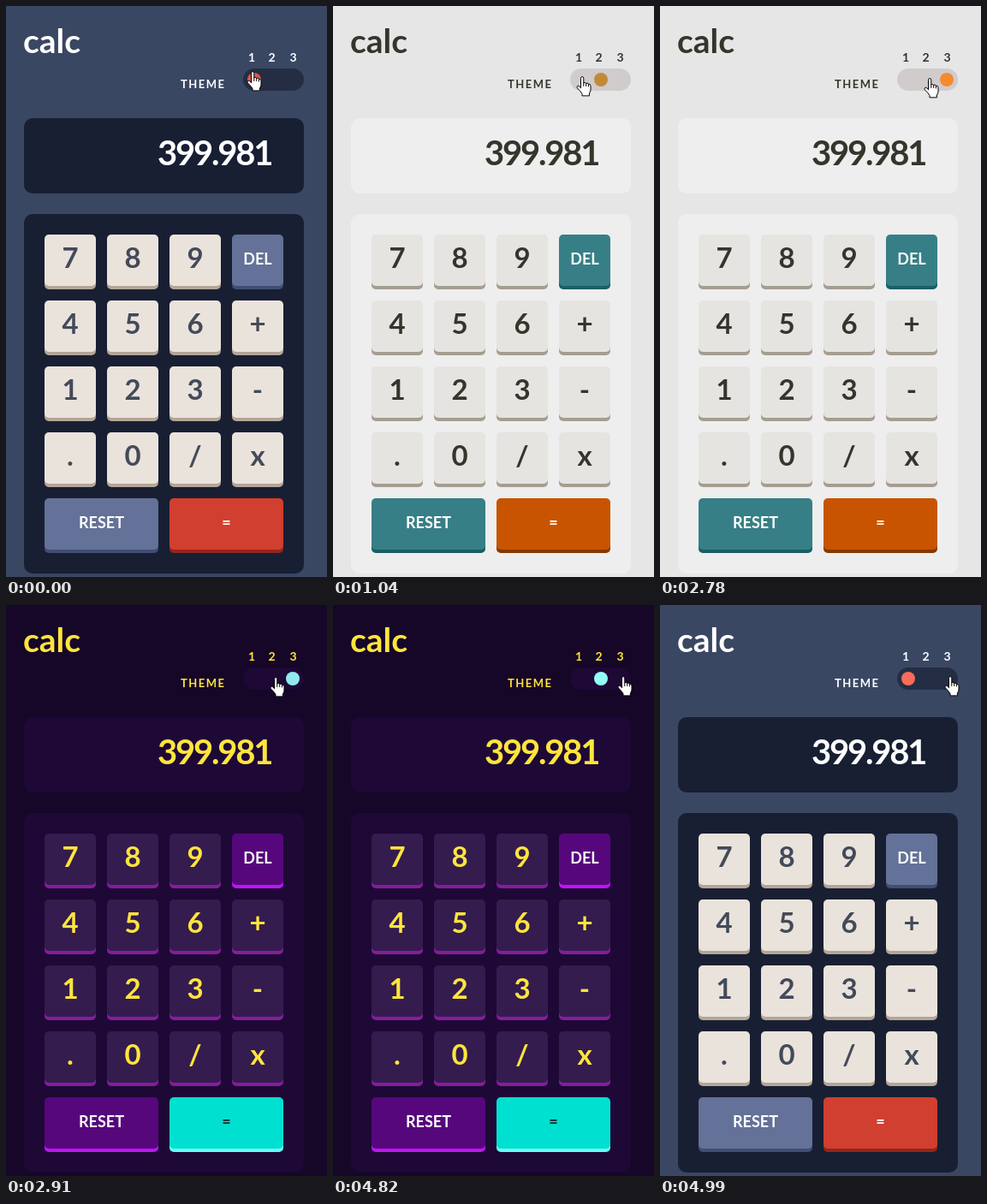
Write an HTML page that moves like this. It is 375 by 667 pixels and loops after 5870 ms.

```html
<!DOCTYPE html>
<html lang="en">
<head>
<meta charset="utf-8">
<title>Calculator themes</title>
<style>
  html, body { margin: 0; width: 100%; height: 100%; overflow: hidden; }
  svg { display: block; width: 375px; height: 667px; font-family: Lato, "Open Sans", sans-serif; font-weight: 700; }
  .t1 { --bg: #3a4763; --track: #242d44; --panel: #181f33; --text: #fff; --key: #eae3dc; --edge: #b4a597;
        --digit: #434a59; --alt: #647198; --altEdge: #414e73; --eq: #d03f2f; --eqEdge: #93261a; --eqText: #fff; }
  .t2 { --bg: #e6e6e6; --track: #d1cccc; --panel: #eee; --text: #35352c; --key: #e5e4e0; --edge: #a69d91;
        --digit: #35352c; --alt: #377f86; --altEdge: #1b5f65; --eq: #c85401; --eqEdge: #873901; --eqText: #fff; }
  .t3 { --bg: #160628; --track: #1e0836; --panel: #1e0836; --text: #ffe53d; --key: #341c4f; --edge: #871c9c;
        --digit: #ffe53d; --alt: #56077c; --altEdge: #be15f4; --eq: #00e0d1; --eqEdge: #6cf9f2; --eqText: #1b2428; }
  .bg { fill: var(--bg); }
  .track { fill: var(--track); }
  .panel { fill: var(--panel); }
  .label { fill: var(--text); }
  .mid { text-anchor: middle; }
  .key rect { fill: var(--key); }
  .key .edge { fill: var(--edge); }
  .key text { fill: var(--digit); font-size: 33px; }
  .alt rect { fill: var(--alt); }
  .alt .edge { fill: var(--altEdge); }
  .alt text { fill: #fff; font-size: 18px; }
  .eq rect { fill: var(--eq); }
  .eq .edge { fill: var(--eqEdge); }
  .eq text { fill: var(--eqText); font-size: 18px; }
</style>
</head>
<body>
<svg id="stage" class="t1" viewBox="0 0 375 667">
  <clipPath id="lower"><rect x="270" y="84" width="80" height="20"/></clipPath>
  <rect class="bg" width="375" height="667"/>
  <text class="label" x="20" y="55" font-size="39">calc</text>
  <text class="label" x="204" y="96" font-size="13" letter-spacing="1.5">THEME</text>
  <g class="label mid" font-size="14">
    <text x="287" y="65">1</text><text x="310.5" y="65">2</text><text x="335.5" y="65">3</text>
  </g>
  <rect class="track" x="277" y="73" width="71" height="26" rx="13"/>
  <circle id="knob" cy="86" r="8"/>
  <circle id="glow" cy="86" r="8" clip-path="url(#lower)"/>
  <rect class="panel" x="21" y="131" width="327" height="88" rx="10"/>
  <text class="label" x="177" y="186" font-size="40" letter-spacing="-2.2">399.981</text>
  <rect class="panel" x="21" y="243" width="327" height="420" rx="10"/>
  <g id="keys" class="mid"></g>
  <g id="hand" stroke="#000" stroke-linejoin="round" stroke-linecap="round">
    <path fill="#fff" d="M5.5 13.5V2.5Q5.5.6 7.1.6Q8.8.6 8.8 2.5V7.8Q10.3 6.9 11.7 8.3Q13.2 7.5 14.4 9.1Q16.9 8.9 17 11.5V16Q17 18 15.4 20V22.9H7V20.5Q5 17.2 1.3 13.8Q.3 12 2.2 11.2Q3.9 11.2 5.5 13.5Z"/>
    <path fill="none" d="M8.8 8V11.5M11.7 8.5V11.5M14.4 9.3V12"/>
  </g>
</svg>
<script>
const LOOP = 5870;
const $ = id => document.getElementById(id);
const stage = $('stage'), knob = $('knob'), glow = $('glow'), hand = $('hand');

function key(label, x, y, w, type) {
  const base = type ? 35 : 39;
  return `<g class="${type || 'key'}" transform="translate(${x} ${y})">
    <rect class="edge" y="4" width="${w}" height="60" rx="5"/>
    <rect width="${w}" height="60" rx="5"/>
    <text x="${w / 2}" y="${base}">${label}</text></g>`;
}

const rows = [['7', '8', '9', 'DEL'], ['4', '5', '6', '+'], ['1', '2', '3', '-'], ['.', '0', '/', 'x']];
$('keys').innerHTML = rows.map((row, r) => row.map((label, c) =>
  key(label, 45 + 73 * c, 267 + 77 * r, 60, label === 'DEL' ? 'alt' : '')).join('')).join('') +
  key('RESET', 45, 575, 133, 'alt') + key('=', 191, 575, 133, 'eq');

// start, end, number of visible steps, from, to
const moves = [
  [30, 130, 4, [281, 76], [284, 82]],
  [1400, 1730, 12, [284, 82], [308, 84]],
  [3120, 3570, 14, [308, 84], [332, 83]]
];

// start, theme, knob x, knob colour, colour of its lower part
const states = [
  [0, 1, 290, '#d65a48'],
  [910, 1, 313, '#f96b5b'],
  [1040, 2, 313, '#c08a3a'],
  [1960, 2, 313, '#c08a3a', '#da8a35'],
  [1990, 2, 313, '#c08a3a', '#f58a30'],
  [2780, 2, 335, '#f58a30'],
  [2910, 3, 335, '#91ebee'],
  [3400, 3, 335, '#91ebee', '#93fff8'],
  [4820, 3, 313, '#93fff8'],
  [4950, 3, 290, '#93fff8'],
  [4990, 1, 290, '#f96b5b']
];

const latest = (list, t) => list.filter(item => item[0] <= t).pop();
const ease = p => p * p * (3 - 2 * p);

function handAt(t) {
  const move = latest(moves, t);
  if (!move) return moves[0][3];
  const [start, end, steps, from, to] = move;
  const done = Math.floor((t - start) / (end - start) * (steps - 1)) + 1;
  const p = ease(Math.min(1, done / steps));
  return from.map((v, i) => Math.round(v + (to[i] - v) * p));
}

function draw(t) {
  const [, theme, x, colour, lower] = latest(states, t);
  stage.setAttribute('class', 't' + theme);
  knob.setAttribute('cx', x);
  knob.setAttribute('fill', colour);
  glow.setAttribute('cx', x);
  glow.setAttribute('fill', lower || 'none');
  hand.setAttribute('transform', `translate(${handAt(t).join(' ')})`);
}

const begin = performance.now();
function tick() {
  draw((performance.now() - begin) % LOOP);
  requestAnimationFrame(tick);
}
tick();
</script>
</body>
</html>
```
